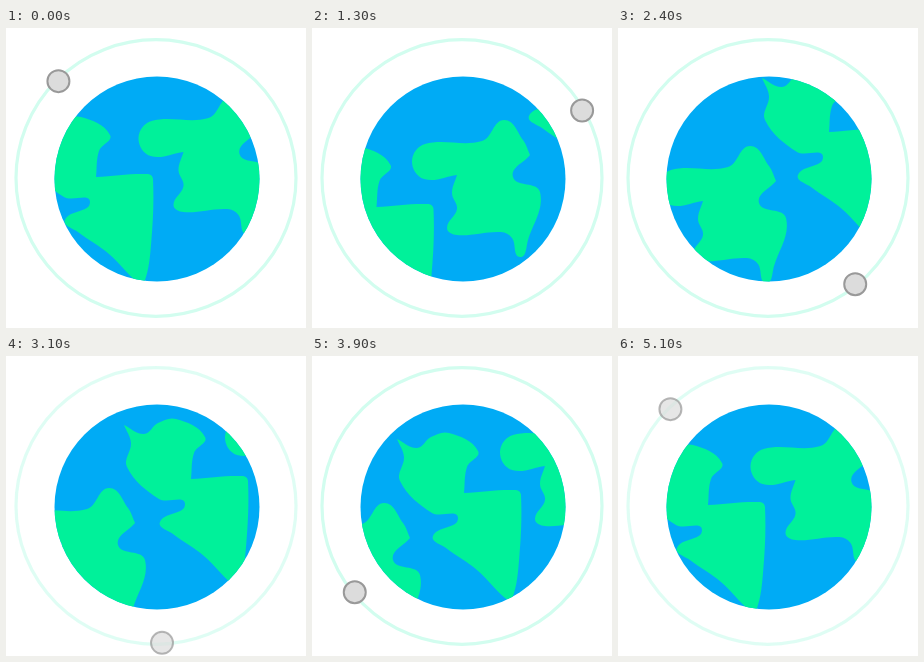
Write an HTML page with a canvas that moves like this. It is 300 px wide and 300 px high and loops after 5200 ms.

```html
<!DOCTYPE html>
<html lang="en">
<head>
<meta charset="utf-8">
<title>Planet with moon</title>
<style>
  html, body { margin: 0; width: 100%; height: 100%; overflow: hidden; background: #fff; }
  canvas { display: block; width: 300px; height: 300px; }
</style>
</head>
<body>
<canvas id="stage" width="300" height="300"></canvas>
<script>
const LOOP = 5200, STEP = 100, TURN = 5100;
const ctx = document.getElementById('stage').getContext('2d');

// Every part eases through the same few moments of a turn.
const moments = [0, 1300, 2400, 3100, 3900, TURN];
const moonAngles = [-45, 60.5, 140.8, 177.5, 231, 315];

// Outlines; a repeated point makes a sharp corner.
const lands = [
  {
    outline: smoothOutline([
      [85, 83], [85, 83], [105, 92], [119, 81], [137, 77], [166, 95], [155, 111],
      [152, 137], [152, 137], [204, 134], [209, 139], [207, 205], [200, 243], [193, 242],
      [165, 214], [134, 192], [121, 180], [146, 162], [120, 157], [88, 125], [92, 101]
    ]),
    x: [121.5, 96, 59, 33, 0, -62],
    y: [-122, -92, -33, -14, 0, 12]
  },
  {
    outline: smoothOutline([
      [100, 133], [113, 116], [170, 113], [192, 92], [211, 112], [218, 127], [218, 127],
      [201, 149], [228, 164], [216, 212], [208, 229], [200, 210], [189, 204], [145, 207],
      [135, 200], [145, 181], [140, 165], [145, 147], [145, 147], [112, 151]
    ]),
    x: [32.5, 0, -60, -89, -120, -175.5],
    y: [-23, 0, 26, 40, 55, 69]
  }
];

// Closed curve whose handles scale with each segment, so it never overshoots.
function smoothOutline(points) {
  const path = new Path2D(), n = points.length;
  const at = i => points[(i + n) % n];
  const handle = (i, reach) => {
    const [px, py] = at(i - 1), [x, y] = at(i), [qx, qy] = at(i + 1);
    const scale = reach / Math.hypot(qx - px, qy - py);
    return [x + (qx - px) * scale, y + (qy - py) * scale];
  };
  path.moveTo(...at(0));
  for (let i = 0; i < n; i++) {
    const [ax, ay] = at(i), [bx, by] = at(i + 1);
    const reach = 0.36 * Math.hypot(bx - ax, by - ay);
    path.bezierCurveTo(...handle(i, reach), ...handle(i + 1, -reach), bx, by);
  }
  path.closePath();
  return path;
}

function between(values, t) {
  const i = Math.min(moments.findLastIndex(m => m <= t), moments.length - 2);
  const u = (t - moments[i]) / (moments[i + 1] - moments[i]);
  return values[i] + (values[i + 1] - values[i]) * u;
}

function ellipse(x, y, rx, ry = rx) {
  ctx.beginPath();
  ctx.ellipse(x, y, rx, ry, 0, 0, Math.PI * 2);
}

function drawPlanet(t) {
  ctx.save();
  ellipse(151, 151, 102.5);
  ctx.fillStyle = '#00abf5';
  ctx.fill();
  ctx.clip();
  ctx.fillStyle = '#00f19a';
  for (const { outline, x, y } of lands) {
    const spanX = x.at(-1) - x[0], spanY = y.at(-1) - y[0];
    for (const turn of [-1, 0, 1]) {
      ctx.save();
      ctx.translate(between(x, t) + turn * spanX, between(y, t) + turn * spanY);
      ctx.fill(outline);
      ctx.restore();
    }
  }
  ctx.restore();
}

// The orbit dims gently, then snaps back.
function orbitAlpha(t) {
  const end = t <= 3100 ? 3100 : TURN;
  return 1 - 0.3 * Math.max(0, 1 - (end - t) / 500);
}

function drawOrbit(t) {
  ctx.globalAlpha = orbitAlpha(t);
  ellipse(150, 150, 140, 138.3);
  ctx.lineWidth = 3.2;
  ctx.strokeStyle = '#d2fdef';
  ctx.stroke();

  const angle = between(moonAngles, t) * Math.PI / 180;
  ellipse(150 + 138 * Math.sin(angle), 150 - 137 * Math.cos(angle), 11);
  ctx.fillStyle = '#dcdcdc';
  ctx.fill();
  ctx.lineWidth = 2;
  ctx.strokeStyle = '#999';
  ctx.stroke();
  ctx.globalAlpha = 1;
}

const start = performance.now();
function tick() {
  const elapsed = Math.max(0, performance.now() - start);
  const t = Math.floor((elapsed % LOOP) / STEP) * STEP;
  ctx.clearRect(0, 0, 300, 300);
  drawPlanet(t);
  drawOrbit(t);
  requestAnimationFrame(tick);
}
tick();
</script>
</body>
</html>
```
